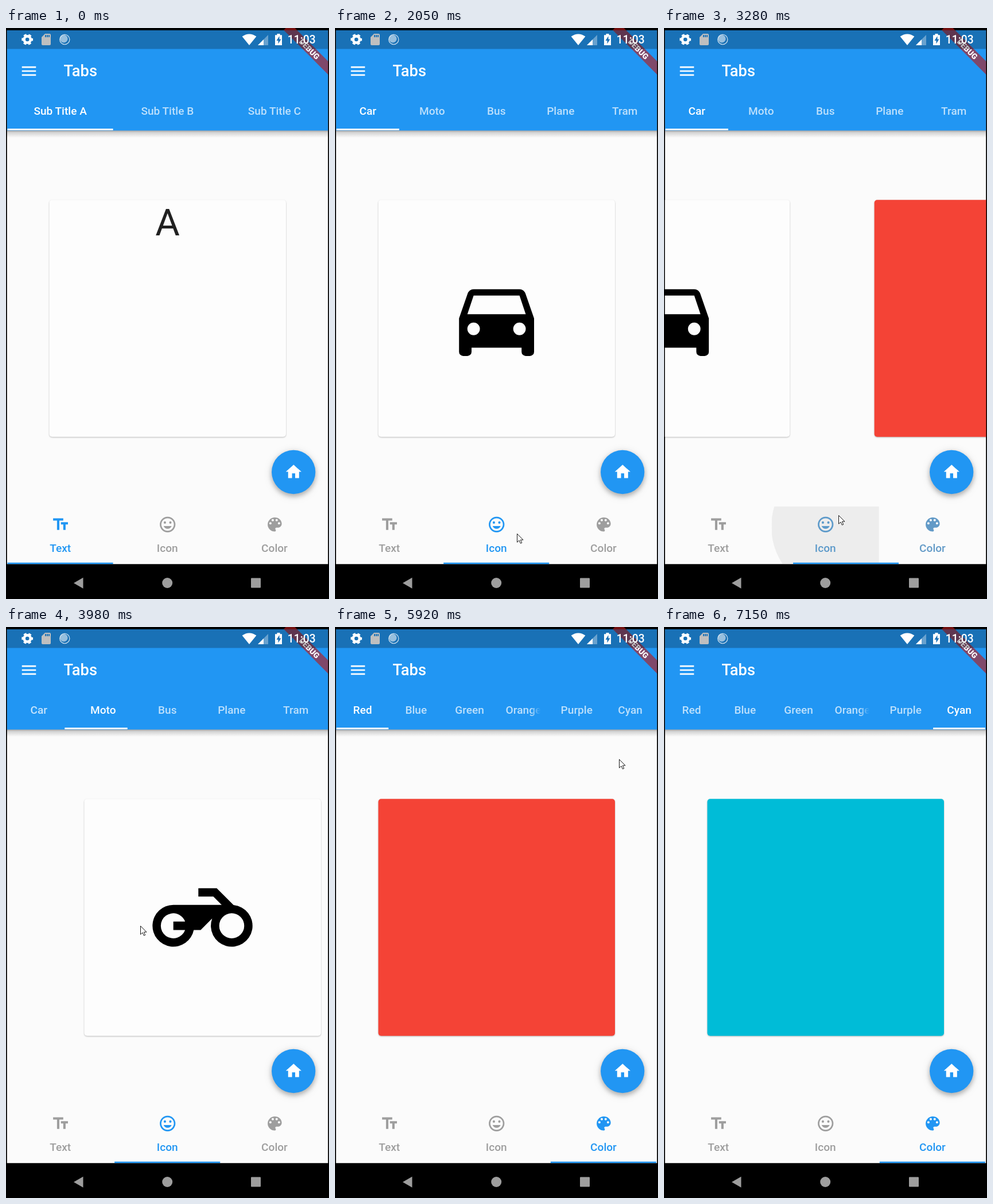
Recreate the animation shown at these times as an HTML page. Size 563 px wide and 994 px high, loop 7.5 s.

```html
<!DOCTYPE html>
<html lang="en">
<head>
<meta charset="utf-8">
<title>Tabs</title>
<style>
html, body { margin: 0; width: 100%; height: 100%; overflow: hidden; background: #000; }
svg { display: block; width: 100vw; height: 100vh; font-family: Roboto, "Open Sans", sans-serif; }
.label { font-size: 19.08px; font-weight: 500; }
.card { filter: drop-shadow(0 1.5px 1px rgba(0,0,0,.26)); }
.fab { filter: drop-shadow(0 4px 4px rgba(0,0,0,.26)) drop-shadow(0 2px 7px rgba(0,0,0,.12)); }
</style>
</head>
<body>
<svg id="stage" viewBox="0 0 563 994" preserveAspectRatio="none">
  <defs>
    <linearGradient id="shade" x2="0" y2="1">
      <stop offset="0" stop-opacity=".36"/><stop offset=".3" stop-opacity=".16"/><stop offset="1" stop-opacity="0"/>
    </linearGradient>
    <linearGradient id="fadeFill" gradientUnits="userSpaceOnUse" x1="340" x2="358.5">
      <stop offset="0" stop-color="#fff"/><stop offset="1" stop-color="#fff" stop-opacity="0"/>
    </linearGradient>
    <mask id="fade" maskUnits="userSpaceOnUse" x="280" y="120" width="79" height="50">
      <rect x="280" y="120" width="79" height="50" fill="url(#fadeFill)"/>
    </mask>
    <clipPath id="rippleClip"><rect id="rippleBox"/></clipPath>
  </defs>
  <rect width="563" height="994"/>
  <rect x="1.5" y="4" width="560" height="929.5" fill="#fbfbfb"/>
  <g id="pages"></g>
  <rect x="1.5" y="178" width="560" height="13" fill="url(#shade)"/>
  <rect x="1.5" y="4" width="560" height="174.5" fill="#2196f3"/>
  <circle id="ripple" fill="#c8c8c8" clip-path="url(#rippleClip)"/>
  <g id="bars"></g>
  <rect id="topLine" y="175.2" height="2.8" fill="#fff"/>
  <rect id="bottomLine" y="930.6" height="2.8" fill="#2196f3"/>
  <text x="100.5" y="84.3" font-size="27.25" font-weight="500" fill="#fff">Tabs</text>
  <circle class="fab" cx="501.2" cy="773" r="38.15" fill="#2196f3"/>
  <g id="fixedIcons"></g>
  <g transform="translate(561.5 4) rotate(45)">
    <rect x="-55" y="38.15" width="110" height="16.35" fill="#b71c1c" fill-opacity=".63"/>
    <text y="51.2" font-size="13.6" font-weight="900" fill="#fff" text-anchor="middle">DEBUG</text>
  </g>
  <rect x="1.5" y="4" width="560" height="32.5" fill-opacity=".25"/>
  <g fill="none" stroke="#fff">
    <circle cx="37.2" cy="20" r="5.6" stroke-width="4.6"/>
    <circle cx="37.2" cy="20" r="8.4" stroke-width="3" stroke-dasharray="4.8 4" stroke-dashoffset="2.4"/>
    <circle cx="102.3" cy="20" r="8.6" stroke-opacity=".75" stroke-width="1.3"/>
  </g>
  <circle cx="100.8" cy="18.8" r="6.8" fill="#fff" fill-opacity=".55"/>
  <g fill="#fff">
    <path d="M424 30L411.6 14.8Q424 6.2 436.4 14.8Z"/>
    <path d="M439 30H457V12Z" fill-opacity=".35"/>
    <path d="M439 30H449V20Z"/>
    <path d="M472.500 10h5v2.300h3.500V30h-12V12.300h3.500z"/>
    <path d="M476.500 14l-5 8h3v5.500l5-8h-3z" fill="#1970b6"/>
    <text x="490.8" y="27" font-size="19.3" font-weight="500">11:03</text>
  </g>
  <path d="M0 4H1.500V994H0ZM561.500 4H563V994H561.500ZM0 933.500H563V994H0Z"/>
  <g fill="#9e9e9e">
    <path d="M118 966.300L134.500 956.800V975.800Z"/>
    <circle cx="281.200" cy="966" r="9"/>
    <rect x="427" y="957.500" width="17" height="17" rx="1"/>
  </g>
  <path id="cursor" d="M.5.5V15.200L4 12 6.400 17.200 8.700 16.200 6.400 11.100H11Z" fill="#fff" stroke="#000" stroke-width=".9"/>
</svg>
<script>
const LOOP = 7500, LEFT = 1.3, WIDTH = 560;
const BLUE = [33, 150, 243], GREY = [158, 158, 158];
const $ = id => document.getElementById(id);

function add(parent, tag, attrs = {}, text) {
  const node = document.createElementNS('http://www.w3.org/2000/svg', tag);
  set(node, attrs);
  if (text) node.textContent = text;
  return parent.appendChild(node);
}
function set(node, attrs) {
  for (const key in attrs) node.setAttribute(key, attrs[key]);
}

const dot = (x, y, r = 1.5) => `M${x - r} ${y}a${r} ${r} 0 1 0 ${2 * r} 0a${r} ${r} 0 1 0 ${-2 * r} 0z`;
const ICONS = {
  menu: 'M3 18h18v-2H3zm0-5h18v-2H3zm0-7v2h18V6z',
  home: 'M10 20v-6h4v6h5v-8h3L12 3 2 12h3v8z',
  sd: 'M18 2h-8L4 8v12c0 1.100.9 2 2 2h12c1.100 0 2-.9 2-2V4c0-1.100-.9-2-2-2zM12 8h-2V4h2zm3 0h-2V4h2zm3 0h-2V4h2z',
  text: 'M2.500 4v3h5v12h3V7h5V4zM21.500 9h-9v3h3v7h3v-7h3z',
  mood: dot(12, 12, 10) + dot(12, 12, 8) + dot(15.5, 9.5) + dot(8.5, 9.5) +
    'M12 17.500c2.330 0 4.310-1.460 5.110-3.500H6.890c.8 2.040 2.780 3.500 5.110 3.500z',
  palette: 'M12 3a9 9 0 0 0 0 18c.83 0 1.500-.67 1.500-1.500 0-.39-.15-.74-.39-1.010-.23-.26-.38-.61-.38-.99 0-.83.67-1.500 1.500-1.500H16c2.760 0 5-2.240 5-5 0-4.420-4.030-8-9-8z' +
    dot(6.5, 10.5) + dot(9.5, 6.5) + dot(14.5, 6.5) + dot(17.5, 10.5),
  car: 'M18.920 6.010C18.720 5.420 18.160 5 17.500 5h-11c-.66 0-1.210.42-1.420 1.010L3 12v8a1 1 0 0 0 1 1h1a1 1 0 0 0 1-1v-1h12v1a1 1 0 0 0 1 1h1a1 1 0 0 0 1-1v-8zM5 11l1.500-4.500h11L19 11z' +
    dot(6.5, 14.5) + dot(17.5, 14.5),
  moto: 'M19.440 9.030L15.410 5H11v2h3.590l2 2H5a5 5 0 1 0 4.900 6h1.650l2.770-2.770A5 5 0 1 0 19.440 9.030zM7.820 15A3 3 0 1 1 7.820 13H5v2z' + dot(19, 14, 3),
  plane: 'M21 16v-2l-8-5V3.500a1.500 1.500 0 0 0-3 0V9l-8 5v2l8-2.500V19l-2 1.500V22l3.500-1 3.500 1v-1.500L13 19v-5.500z'
};
function icon(parent, name, cx, cy, size, fill) {
  const k = size / 24;
  return add(parent, 'path', {
    d: ICONS[name], fill, 'fill-rule': 'evenodd',
    transform: `translate(${cx - size / 2} ${cy - size / 2}) scale(${k})`
  });
}
icon($('fixedIcons'), 'menu', 40, 75, 32.7, '#fff');
icon($('fixedIcons'), 'home', 501.3, 772.6, 32.7, '#fff');
icon($('fixedIcons'), 'sd', 70, 20, 24, '#fff');

// Tab bars
const tabCentre = (i, n) => LEFT + WIDTH * (i + .5) / n;
const topBars = [
  ['Sub Title A', 'Sub Title B', 'Sub Title C'],
  ['Car', 'Moto', 'Bus', 'Plane', 'Tram'],
  ['Red', 'Blue', 'Green', 'Orange', 'Purple', 'Cyan']
].map(names => {
  const group = add($('bars'), 'g');
  const labels = names.map((name, i) => {
    const clipped = name === 'Orange';
    return add(group, 'text', {
      class: 'label', y: 151, fill: '#fff',
      x: clipped ? 297.6 : tabCentre(i, names.length),
      'text-anchor': clipped ? 'start' : 'middle',
      ...(clipped && { mask: 'url(#fade)' })
    }, name);
  });
  return { group, labels };
});
const bottomTabs = [['Text', 'text'], ['Icon', 'mood'], ['Color', 'palette']].map(([name, shape], i) => {
  const group = add($('bars'), 'g');
  const x = tabCentre(i, 3);
  icon(group, shape, x + .4, 864.3, 32.7);
  add(group, 'text', { class: 'label', x, y: 911.5, 'text-anchor': 'middle' }, name);
  return group;
});

// Pages: bar and tab they belong to, plus what the card shows
const pages = {};
function page(name, bar, tab, { letter, shape, fill = '#fdfdfd' }) {
  const group = add($('pages'), 'g');
  add(group, 'rect', { class: 'card', x: 75.5, y: 299.3, width: 412.5, height: 412.5, rx: 5, fill });
  if (letter) add(group, 'text', { x: 281.6, y: 361, 'font-size': 65.4, 'text-anchor': 'middle', fill: '#212121' }, letter);
  if (shape) icon(group, shape, 281.6, 505.6, 174.4, '#000');
  pages[name] = { group, bar, tab };
}
['A', 'B', 'C'].forEach((letter, i) => page(letter, 0, i, { letter }));
page('car', 1, 0, { shape: 'car' });
page('moto', 1, 1, { shape: 'moto' });
page('plane', 1, 3, { shape: 'plane' });
page('red', 2, 0, { fill: '#f44336' });
page('cyan', 2, 5, { fill: '#00bcd7' });

// Timeline
const swipe = (from, to, start) => ({ from, to, start, drag: true });
const tap = (from, to, start, lineTime = 300, lag = 30, pageTime = 300) =>
  ({ from, to, start, lineTime, lag, pageTime });
const moves = [
  swipe('A', 'B', 340),
  swipe('B', 'C', 960),
  tap('C', 'car', 1670),
  tap('car', 'red', 2610),
  tap('red', 'car', 3190, 180, 10, 267),
  swipe('car', 'moto', 3700),
  tap('moto', 'plane', 4790, 300, 147),
  tap('plane', 'red', 5550),
  tap('red', 'cyan', 6390, 300, 60)
];
// start, x, y, hold, tab index, tab count
const ripples = [
  [1660, 300, 884, 180, 1, 3],
  [2600, 455, 885, 180, 2, 3],
  [3190, 304, 868, 180, 1, 3],
  [4700, 395, 150, 280, 3, 5],
  [5545, 470, 890, 180, 2, 3],
  [6315, 512, 150, 280, 5, 6]
];
const cursorPath = [
  [90, 545, 500], [330, 470, 500], [500, 230, 500], [590, 228, 500], [860, 470, 495],
  [960, 470, 495], [1120, 235, 495], [1240, 240, 510], [1600, 300, 884], [1700, 300, 884],
  [2050, 317, 880], [2310, 455, 885], [2700, 455, 885], [3020, 304, 848], [3400, 304, 848],
  [3650, 480, 520], [3700, 480, 520], [3860, 240, 520], [3980, 234, 520], [4100, 236, 515],
  [4680, 395, 150], [4800, 395, 150], [5060, 424, 490], [5490, 470, 890], [5620, 470, 890],
  [5920, 495, 230], [6290, 512, 150], [6420, 512, 150], [7070, 458, 917], [7120, 463, 960], [7150, 466, 985]
];

const clamp = v => Math.max(0, Math.min(1, v));
const lerp = (a, b, p) => a + (b - a) * p;
const mix = (a, b, p) => `rgb(${a.map((v, i) => Math.round(lerp(v, b[i], p)))})`;

// cubic-bezier(.25, .1, .25, 1)
function ease(x) {
  if (x <= 0 || x >= 1) return clamp(x);
  let lo = 0, hi = 1, s;
  for (let i = 0; i < 20; i++) {
    s = (lo + hi) / 2;
    const bx = .75 * s * (1 - s) + s ** 3;
    if (bx < x) lo = s; else hi = s;
  }
  return .3 * s * (1 - s) ** 2 + 3 * s * s * (1 - s) + s ** 3;
}
// The finger pulls the page 45 % of the way, then it settles.
function dragProgress(ms) {
  if (ms < 160) return .45 * Math.pow(clamp(ms / 160), 1.3);
  return 1 - .55 * (1 - clamp((ms - 160) / 290)) ** 3;
}

function placeLine(node, position, count) {
  const w = WIDTH / count;
  set(node, { x: LEFT + position * w + 1.2, width: w - 2.6 });
}
const weight = (i, from, to, p) => i === to ? (from === to ? 1 : p) : i === from ? 1 - p : 0;

function drawTabs(t) {
  const move = moves.filter(m => m.start <= t).pop() || moves[0];
  const from = pages[move.from], to = pages[move.to], ms = t - move.start;
  const pageP = move.drag ? dragProgress(ms) : ease((ms - move.lag) / move.pageTime);
  const lineP = move.drag ? pageP : ease(ms / move.lineTime);
  const dir = to.bar < from.bar ? -1 : 1;

  for (const name in pages) {
    const p = pages[name];
    const x = p === from ? -pageP * dir * WIDTH : p === to ? (1 - pageP) * dir * WIDTH : WIDTH * 2;
    p.group.style.display = Math.abs(x) < WIDTH ? '' : 'none';
    p.group.setAttribute('transform', `translate(${x} 0)`);
  }

  const bar = ms < 0 ? from.bar : to.bar;
  const startTab = from.bar === to.bar ? from.tab : to.tab;
  topBars.forEach(({ group, labels }, i) => {
    group.style.display = i === bar ? '' : 'none';
    if (i === bar) labels.forEach((label, k) =>
      label.setAttribute('fill-opacity', .7 + .3 * weight(k, startTab, to.tab, lineP)));
  });
  placeLine($('topLine'), lerp(startTab, to.tab, lineP), topBars[bar].labels.length);

  placeLine($('bottomLine'), lerp(from.bar, to.bar, lineP), 3);
  bottomTabs.forEach((group, i) =>
    group.setAttribute('fill', mix(GREY, BLUE, weight(i, from.bar, to.bar, pageP))));
}

function drawRipple(t) {
  const active = ripples.filter(r => r[0] <= t).pop();
  if (!active) return set($('ripple'), { opacity: 0 });
  const [start, cx, cy, hold, tab, count] = active, ms = t - start;
  const onTop = cy < 200, w = WIDTH / count;
  set($('rippleBox'), {
    x: LEFT + tab * w, width: w,
    y: onTop ? 112.5 : 833, height: onTop ? 65.5 : 100.5
  });
  set($('ripple'), {
    cx, cy, r: lerp(20, 117, clamp(ms / 90)),
    opacity: .28 * (1 - clamp((ms - hold) / 180))
  });
}

function drawCursor(t) {
  const i = cursorPath.findIndex(k => k[0] > t);
  $('cursor').style.display = i > 0 ? '' : 'none';
  if (i < 1) return;
  const [t0, x0, y0] = cursorPath[i - 1], [t1, x1, y1] = cursorPath[i];
  const u = (t - t0) / (t1 - t0), p = u * u * (3 - 2 * u);
  $('cursor').setAttribute('transform', `translate(${lerp(x0, x1, p)} ${lerp(y0, y1, p)})`);
}

function draw(t) {
  drawTabs(t);
  drawRipple(t);
  drawCursor(t);
}

const begin = performance.now();
function tick() {
  draw((performance.now() - begin) % LOOP);
  requestAnimationFrame(tick);
}
tick();
</script>
</body>
</html>
```
